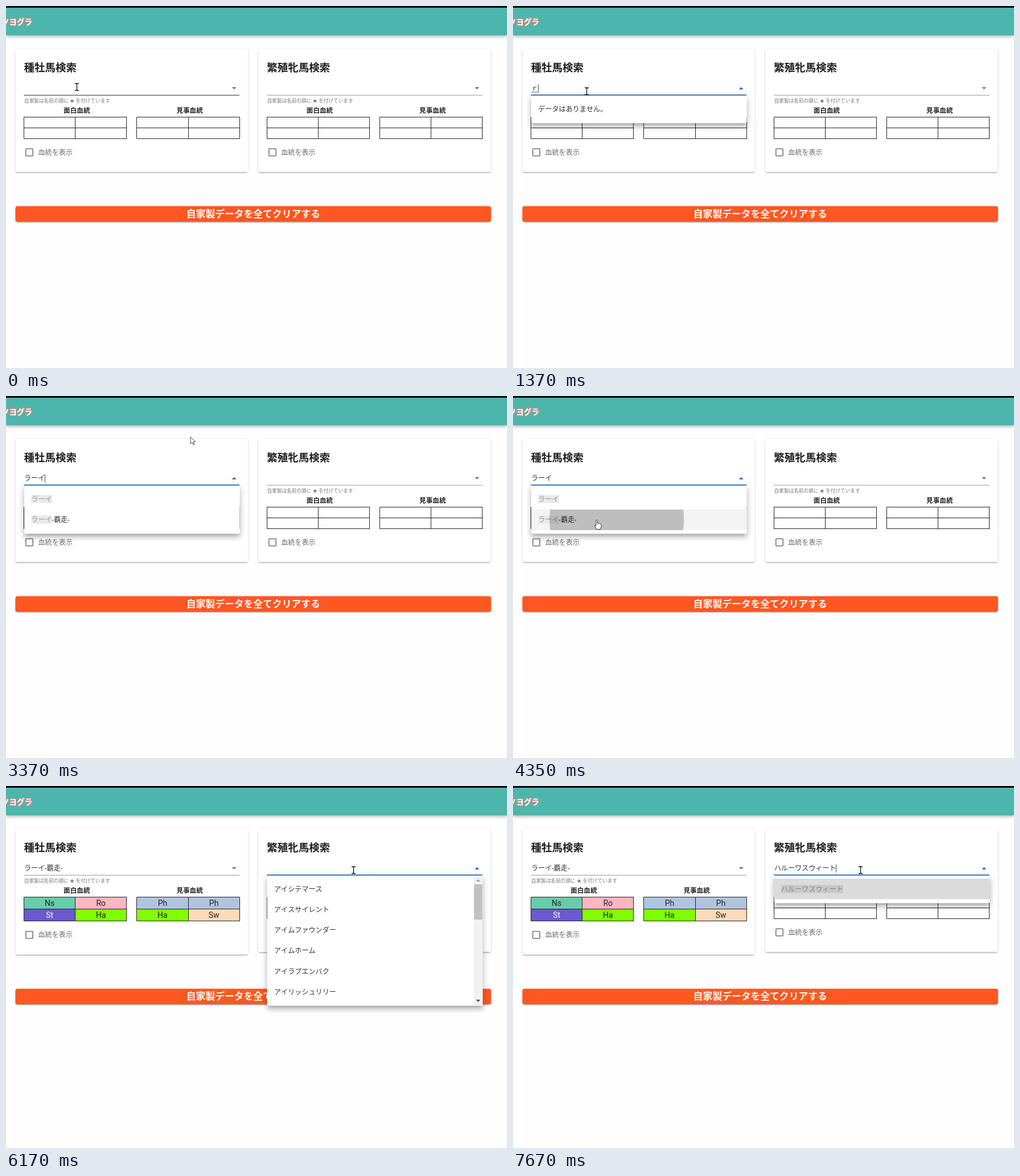
Recreate the animation shown at these times as an HTML page with a canvas. Size 880 by 637 pixels, loop 8000 ms.

```html
<!DOCTYPE html>
<html lang="ja">
<head>
<meta charset="utf-8">
<title>血統検索</title>
<style>
html, body { margin: 0; width: 100%; height: 100%; overflow: hidden; background: #fefefe; }
canvas { display: block; width: 880px; height: 637px; }
</style>
</head>
<body>
<canvas id="stage" width="880" height="637"></canvas>
<script>
const ctx = document.getElementById('stage').getContext('2d');
const LOOP = 8000;
const FONT = 'Roboto, "Noto Sans CJK JP", "Noto Sans CJK", sans-serif';
const BLUE = '#1b6cb5';
const SIZE = 12.1;
const ROW = 36.2;
const RIGHT = 426.7;
const ZOOM = 0.864;

// Shadow layers: drop, blur, spread, alpha
const LOW = [[3, 1, -2, 0.2], [2, 2, 0, 0.14], [1, 5, 0, 0.12]];
const MID = [[2, 4, -1, 0.2], [4, 5, 0, 0.14], [1, 10, 0, 0.12]];
const HIGH = [[5, 5, -3, 0.2], [8, 10, 1, 0.14], [3, 14, 2, 0.12]];

const T = { openLeft: 460, press: 4290, select: 4490, openRight: 5260, paste: 6255, mark: 7320 };
const BLINK_STARTS = [T.openLeft, 1370, 1510, 1710, 1980, 2305, T.select, T.openRight, T.paste];

// Left field contents over time: [start, text, still composing]
const TYPED = [
  [0, '', false], [1370, 'ｒ', true], [1510, 'ら', true], [1710, 'らー', true],
  [1980, 'らーい', true], [2110, 'ラーイ', true], [2305, 'ラーイ', false],
  [T.select, 'ラーイ-覇走-', false]
];
const SIRES = ['アイアンリーフ', 'アオバノミチ', 'アカネハヤテ', 'アサギリロード', 'アズサノハラ', 'アマネステップ'];
const MARES = ['アイシテマース', 'アイスサイレント', 'アイムファウンダー', 'アイムホーム', 'アイラブエンバク', 'アイリッシュリリー'];
const MATCHES = ['ラーイ', 'ラーイ-覇走-'];
const MARE = 'ハルーワスウィート';

const CELLS = [
  [['Ns', '#66cdaa'], ['Ro', '#ffb6c1'], ['St', '#6a5acd'], ['Ha', '#7fff00']],
  [['Ph', '#b0c4de'], ['Ph', '#b0c4de'], ['Ha', '#7fff00'], ['Sw', '#ffdab9']]
];

// Pointer path: time, x, y
const PATH = [
  [0, 124.5, 142.5], [460, 124.5, 142.5], [900, 129.5, 150], [3080, 129.5, 150],
  [3360, 324, 72], [3440, 324, 72], [3860, 240, 160], [4200, 148, 218],
  [4540, 148, 218], [4890, 614.5, 148.5], [4960, 614.5, 148.5], [5120, 610.5, 148],
  [LOOP, 610.5, 148]
];

const clamp = v => Math.max(0, Math.min(1, v));
const easeOut = v => 1 - Math.pow(1 - clamp(v), 2.2);
const lastAt = (list, t) => list.filter(e => e[0] <= t).pop();

function pointerAt(t) {
  const i = Math.max(1, PATH.findIndex(p => p[0] > t));
  const [t0, x0, y0] = PATH[i - 1], [t1, x1, y1] = PATH[i];
  const k = (1 - Math.cos(Math.PI * (t - t0) / (t1 - t0))) / 2;
  return { x: x0 + (x1 - x0) * k, y: y0 + (y1 - y0) * k };
}

function caretOn(t) {
  const start = BLINK_STARTS.filter(b => b <= t).pop();
  return start !== undefined && Math.floor((t - start) / 530) % 2 === 0;
}

function rect(x, y, w, h, color) {
  ctx.fillStyle = color;
  ctx.fillRect(x, y, w, h);
}

function text(str, x, y, size, color = '#303030', weight = 400, align = 'left') {
  ctx.font = `${weight} ${size}px ${FONT}`;
  ctx.textAlign = align;
  ctx.fillStyle = color;
  ctx.fillText(str, x, y + size * 0.37);
}

function widthOf(str) {
  ctx.font = `400 ${SIZE}px ${FONT}`;
  return ctx.measureText(str).width;
}

function box(x, y, w, h, radius) {
  ctx.beginPath();
  ctx.roundRect(x, y, w, h, radius);
  ctx.fill();
}

function panel(x, y, w, h, color, layers, radius = 3.5) {
  const away = 2000;
  ctx.save();
  ctx.fillStyle = '#000';
  ctx.shadowOffsetX = away;
  // Only the shadow of the off-stage box falls on the stage
  for (const [drop, blur, spread, alpha] of layers) {
    const s = spread * ZOOM;
    ctx.shadowColor = `rgba(0,0,0,${alpha})`;
    ctx.shadowBlur = blur * ZOOM;
    ctx.shadowOffsetY = drop * ZOOM;
    box(x - away - s, y - s, w + 2 * s, h + 2 * s, radius);
  }
  ctx.restore();
  ctx.fillStyle = color;
  box(x, y, w, h, radius);
}

function triangle(x, y, half, dir, color) {
  ctx.fillStyle = color;
  ctx.beginPath();
  ctx.moveTo(x - half, y - dir * half / 2);
  ctx.lineTo(x + half, y - dir * half / 2);
  ctx.lineTo(x, y + dir * half / 2);
  ctx.fill();
}

function header() {
  panel(0, 2, 880, 49.5, '#4db6ac', MID, 0);
  rect(0, 0, 880, 3, '#000');
  ctx.save();
  ctx.font = `700 13.5px ${FONT}`;
  ctx.textAlign = 'left';
  ctx.lineJoin = 'round';
  ctx.lineWidth = 2.4;
  ctx.strokeStyle = '#c58f88';
  ctx.strokeText('ソヨグラ', -8, 32.8);
  ctx.restore();
  text('ソヨグラ', -8, 27.8, 13.5, '#fff', 700);
}

function table(x, cells, rowH) {
  const top = 195.5, w = 90.2;
  if (cells) cells.forEach(([label, color], i) => {
    const cx = x + (i % 2) * w, cy = top + Math.floor(i / 2) * rowH;
    rect(cx, cy, w, rowH, color);
    text(label, cx + w / 2, cy + rowH / 2 - 0.2, 14, label === 'St' ? '#fff' : '#222', 400, 'center');
  });
  ctx.strokeStyle = '#222';
  ctx.lineWidth = 1;
  ctx.beginPath();
  for (let i = 0; i < 3; i++) {
    const gx = Math.floor(x + i * w) + 0.5, gy = top + i * rowH;
    ctx.moveTo(gx, top);
    ctx.lineTo(gx, top + 2 * rowH);
    ctx.moveTo(x, gy);
    ctx.lineTo(x + 2 * w + 0.5, gy);
  }
  ctx.stroke();
}

function card(dx, title, filled) {
  const grow = filled ? 4.5 : 0, rowH = filled ? 21 : 19;
  panel(16.5 + dx, 75.5, 408.5, 216.7 + grow, '#fff', LOW);
  text(title, 31.5 + dx, 108, 18.5, '#1f1f1f', 700);
  text('自家製は名前の頭に ★ を付けています', 32 + dx, 166.8, 8.65, '#777');
  ['面白血統', '見事血統'].forEach((name, i) => {
    text(name, 124.3 + dx + i * 198.3, 183.8, 11.6, '#222', 700, 'center');
    table(31.5 + dx + i * 198.3, filled && CELLS[i], rowH);
  });
  ctx.strokeStyle = '#757575';
  ctx.lineWidth = 1.6;
  ctx.beginPath();
  ctx.roundRect(Math.round(34 + dx) + 0.8, 251.3 + grow, 12.4, 12.4, 1);
  ctx.stroke();
  text('血統を表示', 56.5 + dx, 257.3 + grow, SIZE, '#6a6a6a');
}

function field(dx, value, o) {
  const x = 32 + dx;
  text(value, x, 144.6, SIZE);
  const w = widthOf(value);
  if (o.composing) rect(x, 151, w, 1, '#666');
  if (o.caret) rect(Math.floor(x + w), 138, 1, 14, '#34506c');
  if (o.focus) rect(x - 0.5, 155.8, 378.5, 1.7, BLUE);
  else rect(x - 0.5, 156.5, 378.5, 1, o.hover ? '#222' : '#949494');
  triangle(400.7 + dx, 144.8, 4, o.open ? -1 : 1, o.focus ? BLUE : '#757575');
}

function ripple(t, y) {
  const age = t - T.press;
  if (age < 0) return;
  const k = easeOut(age / 250);
  const r = 190 * (0.3 + 0.7 * k);
  ctx.save();
  ctx.beginPath();
  ctx.rect(32, y, 378.5, ROW);
  ctx.clip();
  ctx.fillStyle = `rgba(0,0,0,${0.22 * clamp(age / 50)})`;
  ctx.beginPath();
  ctx.arc(149 + 72 * k, y + ROW / 2, r, 0, 7);
  ctx.fill();
  ctx.restore();
}

function scrollbar(x) {
  rect(x, 159, 15.5, 228, '#f1f1f1');
  rect(x + 0.5, 173, 14.5, 62, '#c1c1c1');
  triangle(x + 7.7, 166, 4, -1, '#a3a3a3');
  triangle(x + 7.7, 378, 4, 1, '#505050');
}

function menu(dx, items, o) {
  const x = 32 + dx, top = 158, w = 378.7;
  const h = o.long ? 228.7 : 12 + ROW * items.length;
  ctx.save();
  ctx.globalAlpha = o.alpha;
  panel(x, top, w, h, '#fff', HIGH);
  items.forEach((item, i) => {
    const y = 163 + i * ROW, mid = y + 18.3;
    if (o.hover === i) rect(x, y + 0.5, w, ROW, '#f3f3f3');
    const hit = o.query && item.startsWith(o.query) ? o.query : '';
    const hitW = hit ? widthOf(hit) : 0;
    if (hit) {
      rect(x + 12.3, mid - 7, hitW, 14, '#e8e8e8');
      text(hit, x + 12.3, mid, SIZE, '#999');
    }
    text(item.slice(hit.length), x + 12.3 + hitW, mid, SIZE);
    if (o.hover === i) ripple(o.time, y + 0.5);
    if (o.mark) rect(x, y, w, ROW, `rgba(0,0,0,${0.14 * o.mark})`);
  });
  if (o.long) scrollbar(x + w - 15.8);
  ctx.restore();
}

function shape(points, x, y, fill, line) {
  ctx.beginPath();
  points.forEach(([px, py]) => ctx.lineTo(x + px, y + py));
  ctx.closePath();
  ctx.fillStyle = fill;
  ctx.fill();
  ctx.strokeStyle = line;
  ctx.lineWidth = 1;
  ctx.stroke();
}

function pointer(p, kind) {
  const { x, y } = p;
  if (kind === 'beam') {
    ctx.strokeStyle = '#111';
    ctx.lineWidth = 1.3;
    ctx.beginPath();
    ctx.moveTo(x, y - 6);
    ctx.lineTo(x, y + 6);
    for (const end of [-6, 6]) {
      ctx.moveTo(x - 3.5, y + end);
      ctx.lineTo(x + 3.5, y + end);
    }
    ctx.stroke();
  } else if (kind === 'hand') {
    shape([[-2, 1], [-1, -0.5], [0.6, 1], [0.6, 6], [3, 6], [5.5, 7], [7.2, 8.5], [6.8, 13],
      [5.5, 16.5], [-1, 16.5], [-4.5, 11], [-4, 9.5], [-2, 10.5]], x, y, '#fff', '#333');
  } else {
    shape([[0, 0], [0, 12], [3, 9.5], [5, 14], [7, 13], [5, 8.8], [9, 8.5]], x, y, '#fff', '#444');
  }
}

function draw(t) {
  const p = pointerAt(t);
  const inField = p.y > 132 && p.y < 158;
  const overLeft = inField && p.x > 32 && p.x < 410;
  const overRight = inField && p.x > 458 && p.x < 837;
  const leftOpen = t >= T.openLeft && t < T.select;
  const rightOpen = t >= T.openRight;
  const filled = t >= T.select;
  const shift = filled ? 4.5 : 0;
  const [, typed, composing] = lastAt(TYPED, t);
  const mare = t >= T.paste ? MARE : '';
  const caret = caretOn(t);

  rect(0, 0, 880, 637, '#fefefe');
  header();
  card(0, '種牡馬検索', filled);
  card(RIGHT, '繁殖牝馬検索', false);
  panel(16.5, 352.3 + shift, 835.5, 27.3, '#ff5722', LOW);
  text('自家製データを全てクリアする', 434.3, 365.7 + shift, 16.8, '#fff', 700, 'center');

  const leftFocus = t >= T.openLeft && !rightOpen;
  field(0, typed, { focus: leftFocus, open: leftOpen, hover: overLeft, caret: leftFocus && caret, composing });
  field(RIGHT, mare, { focus: rightOpen, open: rightOpen, hover: overRight, caret: rightOpen && caret });

  const overList = leftOpen && typed === 'ラーイ' && p.x < 410 && p.y > 163 && p.y < 237;
  if (leftOpen) {
    const alpha = clamp((t - T.openLeft) / 200);
    const hover = overList ? Math.floor((p.y - 163.5) / ROW) : -1;
    if (!typed) menu(0, SIRES, { alpha, long: true });
    else if (typed === 'ラーイ') menu(0, MATCHES, { alpha, query: typed, hover, time: t });
    else menu(0, ['データはありません。'], { alpha });
  }
  if (rightOpen) {
    const alpha = clamp((t - T.openRight) / 200);
    if (mare) menu(RIGHT, [MARE], { alpha, query: MARE, mark: clamp((t - T.mark) / 280) });
    else menu(RIGHT, MARES, { alpha, long: true });
  }

  pointer(p, overList ? 'hand' : overLeft || overRight ? 'beam' : 'arrow');
}

function tick(now) {
  draw(now % LOOP);
  requestAnimationFrame(tick);
}
draw(0);
requestAnimationFrame(tick);
</script>
</body>
</html>
```
